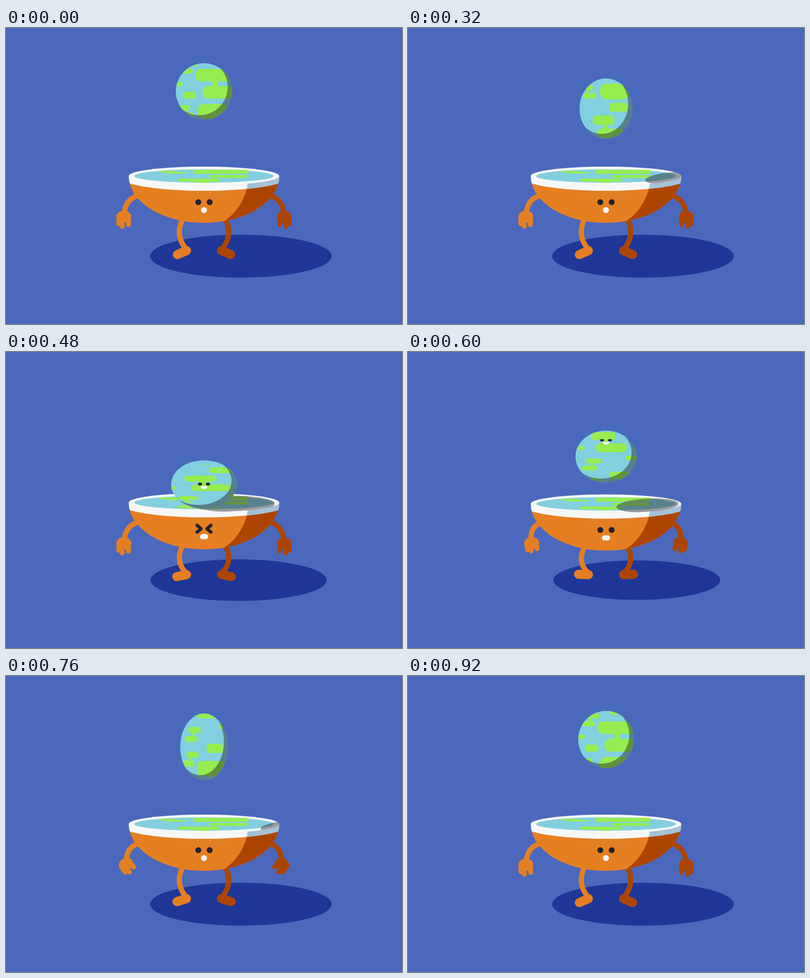
An HTML page that plays this animation: 800 by 600 pixels, repeating every 0.96 s.

```html
<!DOCTYPE html>
<html lang="en">
<head>
<meta charset="utf-8">
<title>Bouncing globe</title>
<style>
  html, body { margin: 0; width: 100%; height: 100%; overflow: hidden; background: #4a69bd; }
  svg { display: block; width: 100%; height: 100%; }
  .limb { fill: none; stroke-linecap: round; stroke-linejoin: round; }
</style>
</head>
<body>
<svg viewBox="0 0 800 600">
  <defs>
    <clipPath id="bodyClip"><path d="M248 300A152 95 0 0 0 552 300Z"/></clipPath>
    <clipPath id="lipClip"><ellipse cx="400" cy="300" rx="152" ry="19"/></clipPath>
    <clipPath id="globeClip"><circle r="57"/></clipPath>
    <clipPath id="ballClip"><ellipse id="ballMask"/></clipPath>
  </defs>
  <rect width="800" height="600" fill="#4a69bd"/>
  <ellipse id="ground" cy="462.5" fill="#1e3799"/>
  <g id="limbs"></g>

  <g id="bowl">
    <g clip-path="url(#bodyClip)">
      <rect x="240" y="290" width="320" height="110" fill="#e67f22"/>
      <path d="M490 300C489 340 468 375 438 393L560 400V290Z" fill="#ad4500"/>
      <ellipse cx="400" cy="302" rx="170" ry="28" fill="#f7f7f7"/>
      <path d="M490 300Q489 314 486.5 326.2A170 28 0 0 0 570 302Z" fill="#a3c1d7"/>
    </g>
    <ellipse cx="400" cy="300" rx="152" ry="19" fill="#f7f7f7"/>
    <ellipse cx="400" cy="300" rx="141" ry="13.5" fill="#82cfdf"/>
    <g class="limb" stroke="#96ec4f">
      <path d="M312 291.2H345M325 293.6H363" stroke-width="3"/>
      <path d="M383 291.6H486" stroke-width="8"/>
      <path d="M415 300.8H485M351 308.5H429M388 310.5H407" stroke-width="5.8"/>
    </g>
    <g clip-path="url(#lipClip)"><ellipse id="cast" fill="#201e26" fill-opacity=".43"/></g>
    <g id="openEyes" fill="#26222b">
      <circle cx="388.5" cy="353" r="6"/><circle cx="411.5" cy="353" r="6"/>
    </g>
    <path id="shutEyes" class="limb" d="M386 346L394 353L386 360M414 346L406 353L414 360"
          stroke="#26222b" stroke-width="6.5"/>
    <rect id="mouth" fill="#f7f7f7"/>
  </g>

  <g clip-path="url(#ballClip)">
    <rect width="800" height="600" fill="#82cfdf"/>
    <g id="globe" clip-path="url(#globeClip)"><g id="land"></g></g>
    <g id="smile">
      <ellipse cx="-8" rx="4.2" ry="2.9" fill="#26222b"/>
      <ellipse cx="8" rx="4.2" ry="2.9" fill="#26222b"/>
      <path d="M-7 4.5H7Q6 10.5 0 10.5T-7 4.5Z" fill="#f7f7f7"/>
    </g>
    <path id="shade" fill="#201e26" fill-opacity=".45" fill-rule="evenodd"
          d="M-80-80H80V80H-80ZM-66.2-8.7a57 57 0 0 0 114 0a57 57 0 0 0-114 0Z"/>
  </g>
</svg>
<script>
const LOOP = 960, STEP = 40, HIT = 480, LEAVE = 530;
const R = 57, TOP = 128.5, DROP = 140, TURN = 248;
const GREEN = '#96ec4f', BLUE = '#82cfdf';
const $ = id => document.getElementById(id);
const set = (el, attrs) => { for (const k in attrs) el.setAttribute(k, attrs[k]); };
const show = (id, on) => set($(id), { visibility: on ? 'visible' : 'hidden' });

// Eased step from 0 to 1, and an eased rise and return
function pass(t, a, b) {
  const u = Math.min(1, Math.max(0, (t - a) / (b - a)));
  return u * u * (3 - 2 * u);
}
const bump = (t, a, peak, b) => pass(t, a, peak) - pass(t, peak, b);

// How far the ball has dropped, 0 at the top and 1 in the bowl
function drop(t) {
  if (t < HIT) {
    const p = t / HIT;
    return .37 * p ** 2 + .63 * p ** 5;
  }
  return Math.min(1, (LOOP - t) / (LOOP - LEAVE)) ** 2.9;
}

const width = t => t < HIT
  ? R - 12 * (t / HIT) ** 3
  : 66.5 - 18.5 * pass(t, 520, 760) + 9 * pass(t, 760, LOOP);

const roll = t => .24 * t - 4 * pass(t, 0, 160) + 21.6 * pass(t, 760, 920);

// Pieces of the unrolled globe; x runs from its middle line
const land = (x1, x2, y, h) =>
  `<rect x="${x1}" y="${y}" width="${x2 - x1}" height="${h}" rx="${h * .44}" fill="${GREEN}"/>`;

function neck(x, y, gap, w) {
  const r = gap / 2, off = w / 2 + r;
  const bay = cx => `<circle cx="${cx}" cy="${y + r}" r="${r}" fill="${BLUE}"/>`;
  return `<rect x="${x - off}" y="${y - 1}" width="${2 * off}" height="${gap + 2}" fill="${GREEN}"/>`
    + bay(x - off) + bay(x + off);
}

const island = (x, y) => land(x - 15, x + 14, y, 10.5);
const pair = (x, y, shift) =>
  island(x, y) + island(x + shift, y + 15.3) + neck(x + shift / 2, y + 10.5, 4.8, 4);

const map = [
  land(-17, 70, -45.5, 25), neck(22.5, -20.5, 10, 9.5), land(-3, 70, -10.5, 25),
  land(-13, 50, 25.5, 30), land(7, 48, 62, 17),
  land(-28.5, 18, 86, 18), neck(-2, 104, 7, 8), land(-19, 39, 111, 19),
  land(36, 70, 138, 10), land(6, 46, 173, 16),
  pair(-42, 28, 7.5), pair(-22, 144.3, -8.5), pair(-27, 186.5, -10),
  land(-43, -16, .5, 14.3), land(-70, -43, 229, 8.5), land(-70, -40, 116.5, 9)
].join('');
$('land').innerHTML = [-TURN, 0, TURN].map(y => `<g transform="translate(0 ${y})">${map}</g>`).join('');

const side = (color, place) => `<g class="limb" stroke="${color}" stroke-width="10.5" transform="${place}">
  <path class="leg"/><path class="foot" stroke-width="18.5"/><path class="arm"/>
  <g class="hand"><ellipse cy="-2.5" rx="15" ry="12.3" fill="${color}" stroke="none"/>
  <path class="fingers" stroke-width="9.8"/></g></g>`;
$('limbs').innerHTML = side('#e67f22', '') + side('#ad4500', 'matrix(-1 0 0 1 800 0)');
const each = (cls, attrs) => document.querySelectorAll('.' + cls).forEach(el => set(el, attrs));

function drawLimbs(t, dy) {
  each('leg', { d: `M357 ${388 + dy}C347 ${405 + dy} 347 ${428 + dy * .4} 363 447` });
  const tilt = (24 - 28 * bump(t, 420, 550, 850)) * Math.PI / 180;
  each('foot', { d: `M364.5 451.2l${-20 * Math.cos(tilt)} ${20 * Math.sin(tilt)}` });

  const swing = bump(t, 480, 600, 900), x = 238 + 12 * swing, y = 385 - 3 * swing + dy;
  each('arm', { d: `M270 ${339 + dy}C${250 + 3 * swing} ${343 + dy} ${x + 1 - 3 * swing} ${y - 27} ${x + 1 - 3 * swing} ${y - 7}` });
  each('hand', { transform: `translate(${x} ${y}) rotate(${-36 * bump(t, 520, 760, 940)})` });
  const g = 1 - .25 * bump(t, 480, 640, 920);
  each('fingers', { d: `M-10 0V${12 * g}M-5 4L-3 ${17 * g}M9.3 0V${13.5 * g}` });
}

function drawBowl(t, dy) {
  set($('bowl'), { transform: `translate(0 ${dy})` });
  const q = 31 * bump(t, 430, 560, 740);
  set($('ground'), { cx: 474.5 - q * .455, rx: 183.5 - q * .545, ry: 43.5 - q * .13 });

  const near = drop(t), s = Math.sqrt(near), rx = 30 + 55 * near;
  const cx = 583 - 210 * s + rx, cy = 304 - 1.5 * near;
  set($('cast'), { cx, cy, rx, ry: 4 + 12.5 * s, transform: `rotate(${14 * (s - 1)} ${cx} ${cy})` });

  const shut = t >= 440 && t < 600;
  show('openEyes', !shut);
  show('shutEyes', shut);
  const m = pass(t, 400, 480) - pass(t, 620, 720), w = 12 + 4.5 * m, h = 12 - 1.5 * m;
  set($('mouth'), { x: 400 - w / 2, y: 369 - h / 2, width: w, height: h, rx: 6 - m * .8 });
}

function drawBall(t) {
  const y = TOP + DROP * drop(t), w = width(t), sx = w / R, sy = 1 / sx;
  const squash = t < HIT ? 1 : 1.2 - .2 * pass(t, HIT, 600);
  set($('ballMask'), { cx: 400, cy: y, rx: w, ry: R * sy });
  set($('globe'), { transform: `translate(400 ${y}) scale(${sx * squash} ${sy / squash})` });
  set($('land'), { transform: `translate(0 ${-roll(t)})` });
  set($('shade'), { transform: `translate(400 ${y}) scale(${sx} ${sy})` });

  const rise = (HIT - t) * .292 - 1;
  set($('smile'), { transform: `translate(400 ${y + rise * sy}) scale(1 ${1 - Math.abs(rise) * .005})` });
  show('smile', t > 360 && rise > -R - 8);
}

function draw(now) {
  const t = Math.floor((now % LOOP) / STEP) * STEP, dy = 10.4 * bump(t, 430, 530, 740);
  drawLimbs(t, dy);
  drawBowl(t, dy);
  drawBall(t);
}

let start;
function tick(now) {
  start ??= now;
  draw(now - start);
  requestAnimationFrame(tick);
}
draw(0);
requestAnimationFrame(tick);
</script>
</body>
</html>
```
